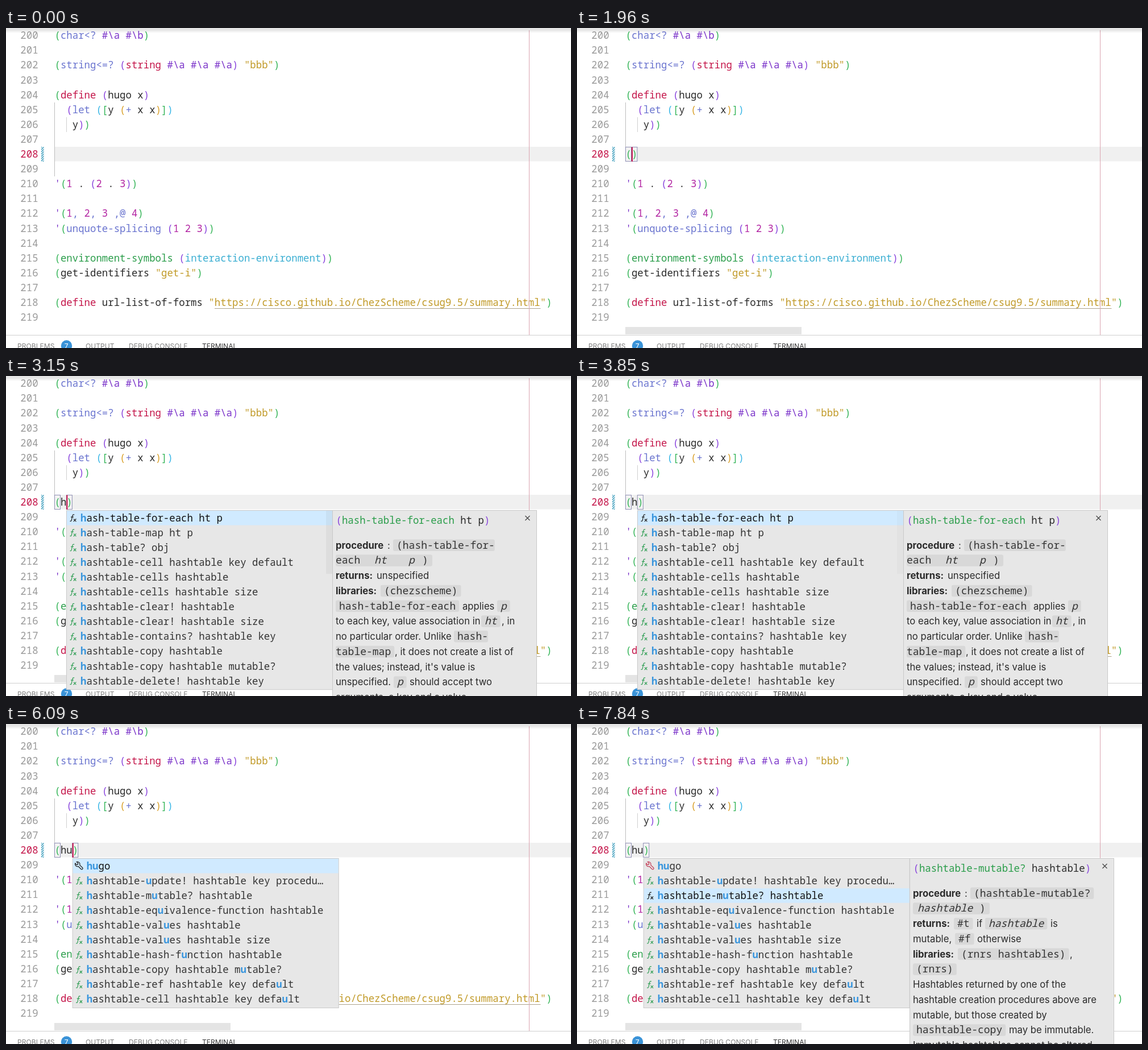
An HTML page for the animation above (8 s loop, 994 by 563 pixels).

```html
<!DOCTYPE html>
<html lang="en">
<head>
<meta charset="utf-8">
<title>Scheme editor completion</title>
<style>
  html, body { margin: 0; width: 100%; height: 100%; overflow: hidden; background: #fff; }
  #stage { display: block; }
  text { white-space: pre; }
  .mono { font: 17.37px "Noto Sans Mono", "DejaVu Sans Mono", monospace; }
  .code { font: 18px "Noto Sans Mono", "DejaVu Sans Mono", monospace; }
  .body { font: 16.7px Inter, "Liberation Sans", sans-serif; }
  .tab { font: 12.1px Inter, "Liberation Sans", sans-serif; }
  .bold { font-weight: 700; }
  .italic { font-style: italic; }
</style>
</head>
<body>
<svg id="stage" width="994" height="563" viewBox="0 0 994 563">
  <defs>
    <linearGradient id="shade" x2="0" y2="1">
      <stop stop-color="#000" stop-opacity=".11"/><stop offset="1" stop-color="#000" stop-opacity="0"/>
    </linearGradient>
    <pattern id="hatch" width="4" height="4" patternUnits="userSpaceOnUse">
      <path d="M-1 5L5 -1M-1 1L1 -1M3 5L5 3" stroke="#2a93b5" stroke-width="1.4"/>
    </pattern>
  </defs>
  <g id="base"></g>
  <g id="live"></g>
</svg>
<script>
const LEFT = 85.5, PITCH = 10.42, ROW = 26.1, FIRST = 200, CODE_PITCH = 10.8, LOOP = 8000;
const COLORS = {
  g: '#35b558', f: '#2a9d4a', p: '#8a45dd', c: '#38b6e6', o: '#d9a02a', b: '#6a74cf', v: '#7a32c9',
  r: '#c4164a', s: '#c19a28', n: '#b224a2', k: '#2a2a2a', t: '#3aaed2', h: '#3a96dd', x: '#9a9a9a'
};

// "~" plus a colour key starts each run
const LINES = String.raw`~g(~bchar<?~v #\a #\b~g)

~g(~bstring<=? ~p(~rstring~v #\a #\a #\a~p) ~s"bbb"~g)

~g(~rdefine ~p(~khugo x~p)
~k  ~p(~blet ~c(~g[~ky ~o(~b+~k x x~o)~g]~c)
~k   y~p)~g)



~v'~g(~n1~k . ~p(~n2~k . ~n3~p)~g)

~v'~g(~n1~b,~n 2~b,~n 3~b ,@~n 4~g)
~v'~g(~bunquote-splicing ~p(~n1 2 3~p)~g)

~g(~fenvironment-symbols ~p(~tinteraction-environment~p)~g)
~g(~kget-identifiers ~s"get-i"~g)

~g(~rdefine~k url-list-of-forms ~s"https://cisco.github.io/ChezScheme/csug9.5/summary.html"~g)
`.split('\n');

const ITEMS = {
  h: ['hash-table-for-each ht p', 'hash-table-map ht p', 'hash-table? obj',
    'hashtable-cell hashtable key default', 'hashtable-cells hashtable', 'hashtable-cells hashtable size',
    'hashtable-clear! hashtable', 'hashtable-clear! hashtable size', 'hashtable-contains? hashtable key',
    'hashtable-copy hashtable', 'hashtable-copy hashtable mutable?', 'hashtable-delete! hashtable key'],
  hu: ['hugo', 'hashtable-update! hashtable key procedu…', 'hashtable-mutable? hashtable',
    'hashtable-equivalence-function hashtable', 'hashtable-values hashtable', 'hashtable-values hashtable size',
    'hashtable-hash-function hashtable', 'hashtable-copy hashtable mutable?', 'hashtable-ref hashtable key default',
    'hashtable-cell hashtable key default']
};

// Pieces are "<x><kind> <text>". T body, B bold, C code chip, I italic chip,
// L/R chip open on its right/left side, W bare chip of a width, c/i code without a chip
const DOCS = {
  each: ['~p(~fhash-table-for-each~k ht p~p)',
    '0B procedure|91T :|101L (hash-table-for-',
    '0W 170|0c each|68i ht|128i p|152c )',
    '0B returns:|72T unspecified',
    '0B libraries:|79C (chezscheme)',
    '0C hash-table-for-each|223T applies|284I p',
    '0T to each key, value association in|256I ht|292T , in',
    '0T no particular order. Unlike|208L hash-',
    '0R table-map|104T , it does not create a list of',
    "0T the values; instead, it's value is",
    '0T unspecified.|102I p|130T should accept two',
    '0T arguments, a key and a value'],
  update: ['~p(~fhashtable-update!~k hashtable key procedure',
    '0B procedure|91T :|101C (hashtable-update!',
    '0W 340|8i hashtable|144i key|214i procedure',
    '0W 113|8i default|95c )',
    '0B returns:|72T unspecified',
    '0B libraries:|79C (rnrs hashtables)|276T ,',
    '0C (rnrs)',
    '0I hashtable|115T must be a mutable',
    '0T hashtable.|87I key|137T should be an',
    "0T appropriate key for the hashtable's hash",
    '0T and equivalence functions.|217I default',
    '0T may be any Scheme object.'],
  mutable: ['~p(~fhashtable-mutable?~k hashtable~p)',
    '0B procedure|91T :|101C (hashtable-mutable?',
    '0W 135|8i hashtable|117c )',
    '0B returns:|72C #t|112T if|127I hashtable|242T is',
    '0T mutable,|74C #f|113T otherwise',
    '0B libraries:|79C (rnrs hashtables)|276T ,',
    '0C (rnrs)',
    '0T Hashtables returned by one of the',
    '0T hashtable creation procedures above are',
    '0T mutable, but those created by',
    '0C hashtable-copy|169T may be immutable.',
    '0T Immutable hashtables cannot be altered']
};

const FX = 'M8.2 1.6q-2.6-1-3.2 1.6L3.2 11.4q-.5 2-2.7 1.4M2 5.6h5M7 8.8l4.4 4.8M11.4 8.8l-4.6 4.8';
const WRENCH = 'M3.6 1.1L6 3.5 5.6 5.6 3.5 6 1.1 3.6A4.3 4.3 0 0 0 6.6 9L11.5 14A1.8 1.8 0 0 0 14 11.5L9 6.6A4.3 4.3 0 0 0 3.6 1.1Z';

const esc = s => s.replace(/&/g, '&amp;').replace(/</g, '&lt;');
const text = (x, y, cls, fill, s) => `<text x="${x}" y="${y}" class="${cls}" fill="${fill}">${esc(s)}</text>`;
const rect = (x, y, w, h, fill, extra = '') =>
  `<rect x="${x}" y="${y}" width="${w}" height="${h}" fill="${fill}" ${extra}/>`;
const stroke = (d, color, width = 1, extra = '') =>
  `<path d="${d}" fill="none" stroke="${color}" stroke-width="${width}" ${extra}/>`;
const rowTop = n => 209 + (n - 208) * ROW;
const clamp = v => Math.min(1, Math.max(0, v));
const fade = (t, from, to) => clamp((t - from) / (to - from));

function runs(x, y, line) {
  let col = 0;
  return line.split('~').slice(1).map(run => {
    const s = run.slice(1);
    const out = text(x + col * PITCH, y, 'mono', COLORS[run[0]], s);
    col += s.length;
    return out;
  }).join('');
}

function base() {
  let out = rect(LEFT, 209, 994, 25.5, '#f0f0f0');
  out += stroke('M85.5 131V209', '#bdbdbd') + stroke('M106.5 157V183', '#d0d0d0');
  LINES.forEach((line, i) => {
    const n = FIRST + i, y = rowTop(n) + 19;
    out += text(25.3, y, 'mono', n === 208 ? COLORS.r : COLORS.x, String(n)) + runs(LEFT, y, line);
  });
  out += stroke('M367 493.5H940.5', '#aca38c') + stroke('M920.5 4V540', '#dba5b1');
  out += rect(62, 209, 4.5, 26, 'url(#hatch)');
  out += rect(0, 0, 994, 3, '#e6e6e6') + rect(0, 3, 994, 6, 'url(#shade)');
  out += stroke('M0 540.5H994', '#cfcfcf');
  out += '<circle cx="106.5" cy="559" r="9.7" fill="#3a93d8"/>' + text(102.8, 563.5, 'tab', '#fff', '7');
  [[20, 'PROBLEMS'], [140, 'OUTPUT'], [216, 'DEBUG CONSOLE'], [345, 'TERMINAL']].forEach(([x, s]) =>
    out += text(x, 564, 'tab', s === 'TERMINAL' ? '#383838' : '#808080', s));
  return out;
}

function item(x, y, label, query, selected) {
  const ink = selected ? '#111' : '#333';
  const isUser = label === 'hugo';
  const iconColor = selected ? '#222' : isUser ? '#c4405a' : '#35a058';
  let out = `<g transform="translate(${x + 6} ${y + 6})">`
    + `${stroke(isUser ? WRENCH : FX, iconColor, 1.25, isUser ? 'transform="translate(-2 -1)"' : '')}</g>`;
  const put = (from, to, cls, fill) => {
    if (to > from) out += text(x + 25 + from * PITCH, y + 19, cls, fill, label.slice(from, to));
  };
  let plain = 0;
  for (const letter of query) {
    const hit = label.indexOf(letter, plain);
    put(plain, hit, 'mono', ink);
    put(hit, hit + 1, 'mono bold', COLORS.h);
    plain = hit + 1;
  }
  put(plain, label.length, 'mono', ink);
  return out;
}

function popup(query, selected, slider) {
  const x = LEFT + 20.5 + (query.length - 1) * 10.7, items = ITEMS[query], h = items.length * ROW + 2;
  let out = rect(x + .5, 236.5, 468, h, '#e7e7e7', 'stroke="#c9c9c9"');
  out += rect(x + 1, 237 + selected * ROW, 467, ROW - .6, '#d0eaff');
  out += rect(x + 457, 237, 11, query === 'h' ? 111 : 25.5, '#646464', `opacity="${slider * .08}"`);
  items.forEach((label, i) => out += item(x, 236.5 + i * ROW, label, query, i === selected));
  return out;
}

function piece(spec, mid) {
  const [, at, kind, s] = spec.match(/^(\d+)(\w) (.*)$/);
  const x = +at, y = mid + 6;
  if (kind === 'T' || kind === 'B') return text(x, y, kind === 'B' ? 'body bold' : 'body', '#2a2a2a', s);
  const padLeft = 'CIL'.includes(kind) ? 6 : 0, padRight = 'CIR'.includes(kind) ? 6 : 0;
  const width = kind === 'W' ? +s : s.length * CODE_PITCH + padLeft + padRight;
  let out = 'ci'.includes(kind) ? '' : rect(x, mid - 10, width, 20.5, '#d8d8d8', 'rx="3"');
  if (kind !== 'W') out += text(x + padLeft, y, /i/i.test(kind) ? 'code italic' : 'code', '#333', s);
  return out;
}

function docs(x, name) {
  const [title, ...lines] = DOCS[name];
  return rect(x + .5, 236.5, 359, 340, '#e7e7e7', 'stroke="#c9c9c9"')
    + `<svg x="${x + 6}" y="0" width="327" height="563">${runs(.5, 260, title)}`
    + lines.map((line, i) => line.split('|').map(p => piece(p, 297.5 + i * 26.75)).join('')).join('')
    + '</svg>'
    + stroke(`M${x + 339.5} 246l8 8m0-8l-8 8`, '#444', 1.2);
}

function cursorOn(t) {
  const toggles = [280, 770, 1330, 1820, 1890, 2450, 3010, 3570, 3990, 4480, 5040, 5530, 6090, 6580, 7140, 7630];
  return toggles.filter(at => at <= t).length % 2 === 1;
}

function live(t) {
  const typed = t < 1890 ? null : t < 3010 ? '' : t < 3990 ? 'h' : 'hu';
  let out = rect(85, 526, 310, 13, '#e4e4e4', `opacity="${fade(t, 70, 840)}"`);
  if (typed === null) {
    out += stroke('M85.5 209V261', '#bdbdbd');
  } else {
    const close = LEFT + (typed.length + 1) * PITCH;
    for (const x of [LEFT, close]) out += rect(x, 209.5, PITCH - .4, 25, '#f3f3f3', 'stroke="#8f8fb4"');
    out += runs(LEFT, 228, `~g(~k${typed}~g)`);
  }
  if (cursorOn(t)) out += rect(LEFT + (typed === null ? 0 : typed.length + 1) * PITCH, 209.5, 2, 25.5, '#c4104a');
  if (typed === 'h' && t >= 3080) {
    out += popup('h', 0, 1 - fade(t, 3780, 3920));
    if (t >= 3150) out += docs(574, 'each');
  }
  if (typed === 'hu') {
    const selected = t < 6370 ? 0 : t < 7840 ? 1 : 2;
    out += popup('hu', selected, 1 - fade(t, 4270, 4480));
    if (selected) out += docs(585, selected === 1 ? 'update' : 'mutable');
  }
  return out;
}

document.getElementById('base').innerHTML = base();
const layer = document.getElementById('live');
let shown = '';
const start = performance.now();
function frame() {
  const markup = live((performance.now() - start) % LOOP);
  if (markup !== shown) layer.innerHTML = shown = markup;
  requestAnimationFrame(frame);
}
frame();
</script>
</body>
</html>
```
